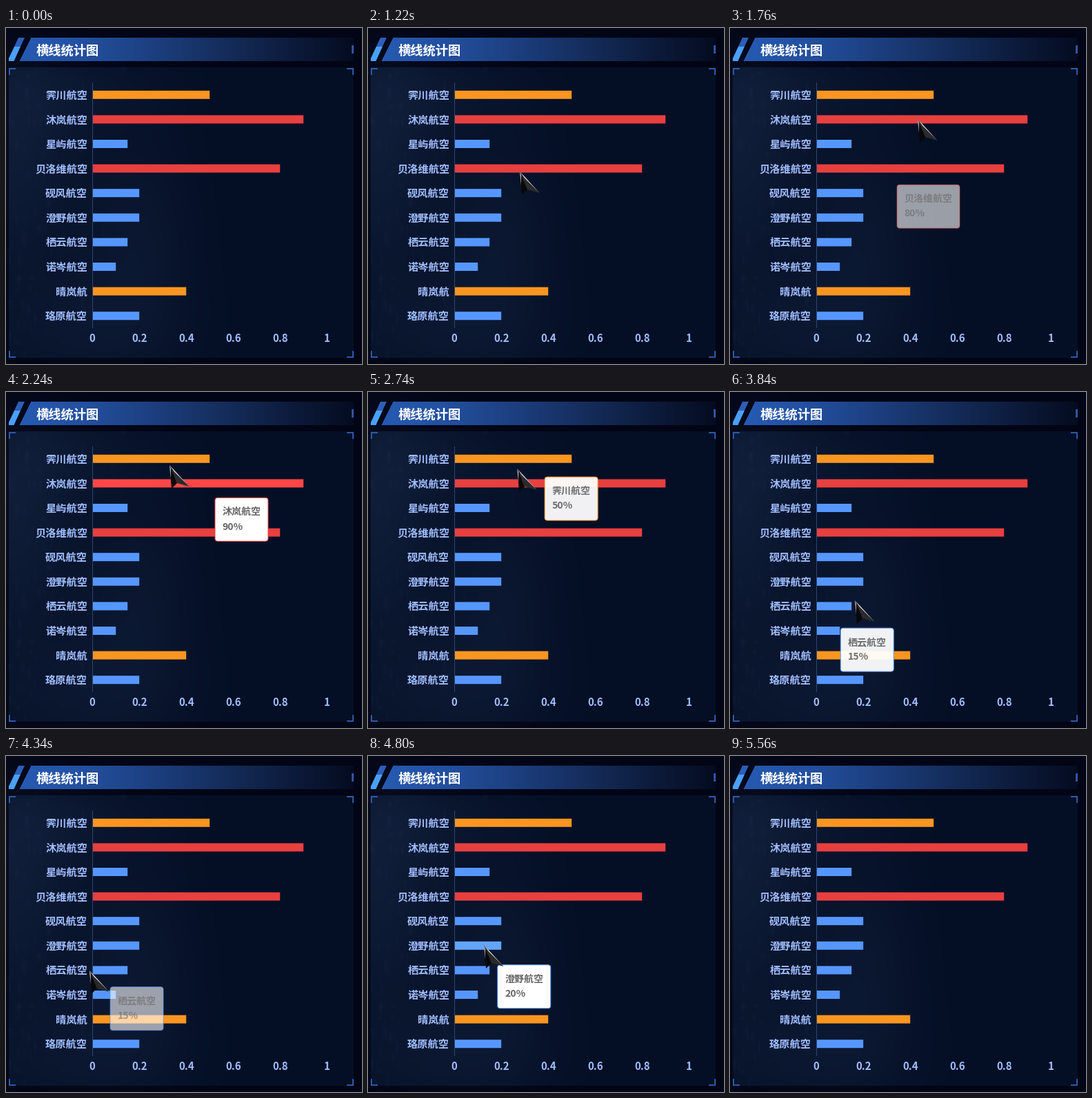
Animation of 516x487 px, one loop 5.9 s. Source, as a matplotlib script:

```python
import numpy as np
import matplotlib.pyplot as plt
from matplotlib.animation import FuncAnimation
from matplotlib.patches import FancyBboxPatch, Polygon, Rectangle
from matplotlib.transforms import Affine2D

W, H, DPI = 516, 487, 100
PX = 72 / DPI
FRAME_MS, LOOP_MS = 20, 5900
MOVE_START, MOVE_STEP, MOVE_COUNT = 260, 68.83, 77

plt.rcParams["font.family"] = ["Noto Sans CJK JP", "DejaVu Sans"]
plt.rcParams["toolbar"] = "None"

BLUE, ORANGE, RED = "#5697ff", "#fa9620", "#e83f3f"
HOT = {BLUE: "#62a5ff", ORANGE: "#ffa528", RED: "#ff4646"}
BARS = [
    ("霁川航空", 0.5), ("沐岚航空", 0.9), ("星屿航空", 0.15),
    ("贝洛维航空", 0.8), ("砚风航空", 0.2), ("澄野航空", 0.2),
    ("栖云航空", 0.15), ("诺岑航空", 0.1), ("晴岚航", 0.4),
    ("珞原航空", 0.2),
]
X0, TOP, PITCH, UNIT, THICK = 125.2, 79, 35.6, 340, 12
TIP_OFFSET, TIP_EASE = np.array((19.6, 25.6)), 0.6

# Where the pointer turns or rests: step, x, y
TURNS = np.array([
    (0, 309, 403), (5, 206, 203), (6, 195, 144), (8, 199, 192),
    (9, 199, 212), (12, 204, 220), (14, 220, 208), (16, 220, 203),
    (19, 222, 201), (22, 272, 132), (24, 283, 127), (28, 283, 127),
    (29, 237, 106), (30, 231, 77), (34, 236, 97), (38, 184, 136),
    (40, 160, 289), (42, 147, 313), (43, 141, 346), (46, 90, 348),
    (49, 141, 341), (50, 141, 311), (51, 167, 303), (52, 181, 302),
    (58, 112, 311), (62, 169, 307), (63, 168, 275), (66, 168, 274),
    (70, 215, 221), (76, 473, 466),
], float)


def bar_color(value):
    return RED if value >= 0.8 else ORANGE if value >= 0.4 else BLUE


def smooth(t, keys, vals):
    """Monotone cubic curve through the keys, without overshoot."""
    gap = np.diff(keys)
    slope = np.diff(vals) / gap
    a, b = slope[:-1], slope[1:]
    same = a * b > 0
    tangent = np.zeros_like(vals)
    tangent[1:-1][same] = 2 * a[same] * b[same] / (a + b)[same]
    k = np.clip(np.searchsorted(keys, t, "right") - 1, 0, len(gap) - 1)
    u = (t - keys[k]) / gap[k]
    ease = u * u * (3 - 2 * u)
    return (vals[k] + ease * (vals[k + 1] - vals[k])
            + gap[k] * u * (1 - u)
            * ((1 - u) * tangent[k] - u * tangent[k + 1]))


def hovered(x, y):
    """Index of the bar under the pointer, or None."""
    k = int((y - TOP) // PITCH)
    if 0 <= k < len(BARS) and abs(y - TOP - PITCH * (k + 0.5)) < THICK / 2:
        if X0 <= x <= X0 + BARS[k][1] * UNIT:
            return k
    return None


def track():
    """Pointer and tooltip state per step; the tooltip reacts a step late."""
    steps = np.arange(MOVE_COUNT)
    path = np.column_stack([smooth(steps, TURNS[:, 0], TURNS[:, c])
                            for c in (1, 2)])
    states, owner, missed, alpha = [], 0, 9, 0
    pos = goal = np.zeros(2)
    for step in steps:
        last = path[max(step - 1, 0)]
        hot = hovered(*last)
        if hot is None:
            missed += 1
        else:
            owner, missed, goal = hot, 0, last + TIP_OFFSET
            if alpha == 0:
                pos = goal
        pos = pos + TIP_EASE * (goal - pos)
        alpha = max(0, 1 - 0.05 * missed ** 3)
        states.append((path[step], hot, owner, alpha, pos))
    return states


def backdrop():
    """Night-blue page, textured panel and fading title strip."""
    rng = np.random.default_rng(7)
    y, x = np.mgrid[0:H, 0:W].astype(float)
    img = np.empty((H, W, 3))
    img[:] = (2, 5, 21)

    def glow(cx, cy, sx, sy):
        return np.exp(-((x - cx) / sx) ** 2 - ((y - cy) / sy) ** 2)

    light = (0.75 * glow(10, 170, 90, 190) + 0.45 * glow(190, 300, 80, 150)
             + 0.4 * glow(110, 440, 140, 90) + 0.3 * glow(110, 90, 130, 60))
    for _ in range(90):
        cx, cy = rng.exponential(50), rng.uniform(55, 480)
        light += rng.uniform(0.06, 0.25) * glow(
            cx, cy, rng.uniform(1, 4), rng.uniform(2, 9))
    panel = np.array((4, 15, 37)) + light[..., None] * (15, 18, 24)
    inside = (x >= 4) & (x < 504) & (y >= 57) & (y < 478)
    img += light[..., None] * (7, 9, 13)
    img[inside] = panel[inside]

    strip = (y >= 14) & (y < 48) & (x >= 36 - (y - 14) / 2) & (x < 504)
    stops = [20, 110, 200, 350, 430, 504]
    fade = [np.interp(x, stops, c) for c in (
        (38, 35, 29, 18, 11, 5),
        (90, 80, 65, 39, 24, 12),
        (178, 160, 131, 80, 54, 32))]
    img[strip] = np.stack(fade, -1)[strip]
    return np.clip(img, 0, 255).astype(np.uint8)


fig = plt.figure(figsize=(W / DPI, H / DPI), dpi=DPI, facecolor="#020515")
ax = fig.add_axes([0, 0, 1, 1])
ax.axis("off")
ax.imshow(backdrop(), extent=(0, W, H, 0), aspect="auto",
          interpolation="nearest")
ax.set(xlim=(0, W), ylim=(H, 0))


def rect(x, y, w, h, color, **kw):
    return ax.add_patch(Rectangle((x, y), w, h, fc=color, lw=0, **kw))


def poly(points, color, **kw):
    return ax.add_patch(Polygon(points, closed=True, fc=color, lw=0, **kw))


def label(x, y, text, size, color, ha="left", **kw):
    return ax.text(x, y, text, fontsize=size * PX, color=color, ha=ha,
                   va="baseline", weight="bold", **kw)


# Title
poly([(18, 14), (27, 14), (21, 27), (12, 27)], "#2c5fb9")
poly([(12, 27), (21, 27), (11.5, 48), (4, 48), (4, 44)], "#4aa0fa")
label(44, 38.3, "横线统计图", 18.3, "white")
rect(501, 25, 3, 12, "#2d55a5")

# Panel corners
for cx, sx in ((4, 1), (504, -1)):
    for cy, sy in ((58, 1), (478, -1)):
        rect(cx, cy, 10 * sx, 2 * sy, "#2a5aaa")
        rect(cx, cy, 2 * sx, 10 * sy, "#2a5aaa")

# Chart
bars = []
for i, (name, value) in enumerate(BARS):
    mid = TOP + PITCH * (i + 0.5)
    bars.append(rect(X0, mid - THICK / 2, value * UNIT, THICK,
                     bar_color(value), snap=False))
    label(118.2, mid + 5.9, name, 15.2, "#a0beff", "right")
rect(125, TOP, 1, 10 * PITCH, "#2c4674")
for i in range(6):
    label(X0 + i * UNIT / 5, 455.4, f"{i / 5:g}", 15, "#a0beff", "center")

# Tooltip
box_move = Affine2D()
box_tr = box_move + ax.transData
box = ax.add_patch(FancyBboxPatch(
    (0.5, 0.5), 77, 63, boxstyle="round,pad=0,rounding_size=4",
    fc="white", ec=RED, lw=PX, zorder=5, transform=box_tr))
head = label(11, 25.2, "", 14, "#666666", zorder=6, transform=box_tr)
rate = label(11, 46.8, "", 14, "#666666", zorder=6, transform=box_tr)
tooltip = [box, head, rate]

# Pointer
tip_move = Affine2D()
tip_tr = tip_move + ax.transData
pointer = [poly(points, color, zorder=8, transform=tip_tr)
           for points, color in (
               ([(0, 0), (3, 34), (11, 26)], "#08080a"),
               ([(0, 0), (11, 26), (28.5, 31)], "#2a2a2c"),
               ([(0, 0), (28.5, 31), (7, 9.5)], "#eeeeee"),
               ([(0, 0), (2, 20), (1.8, 5)], "#d8d8d8"))]

STATES = track()


def update(i):
    step = int(np.floor((i * FRAME_MS - MOVE_START) / MOVE_STEP + 0.3))
    active = i * FRAME_MS >= MOVE_START and step < MOVE_COUNT
    tip, hot, owner, alpha, pos = STATES[step if active else 0]

    for k, (bar, (_, value)) in enumerate(zip(bars, BARS)):
        color = bar_color(value)
        bar.set_facecolor(HOT[color] if active and k == hot else color)

    tip_move.clear().translate(*tip)
    for part in pointer:
        part.set_visible(active)

    name, value = BARS[owner]
    box_move.clear().translate(*pos)
    box.set_width(14 * len(name) + 21)
    box.set_edgecolor(bar_color(value))
    head.set_text(name)
    rate.set_text(f"{value:.0%}")
    for part in tooltip:
        part.set_visible(active and alpha > 0)
        part.set_alpha(alpha)
    return bars + tooltip + pointer


anim = FuncAnimation(fig, update, frames=LOOP_MS // FRAME_MS,
                     interval=FRAME_MS, repeat=True, repeat_delay=0,
                     blit=False)
plt.show()
```
